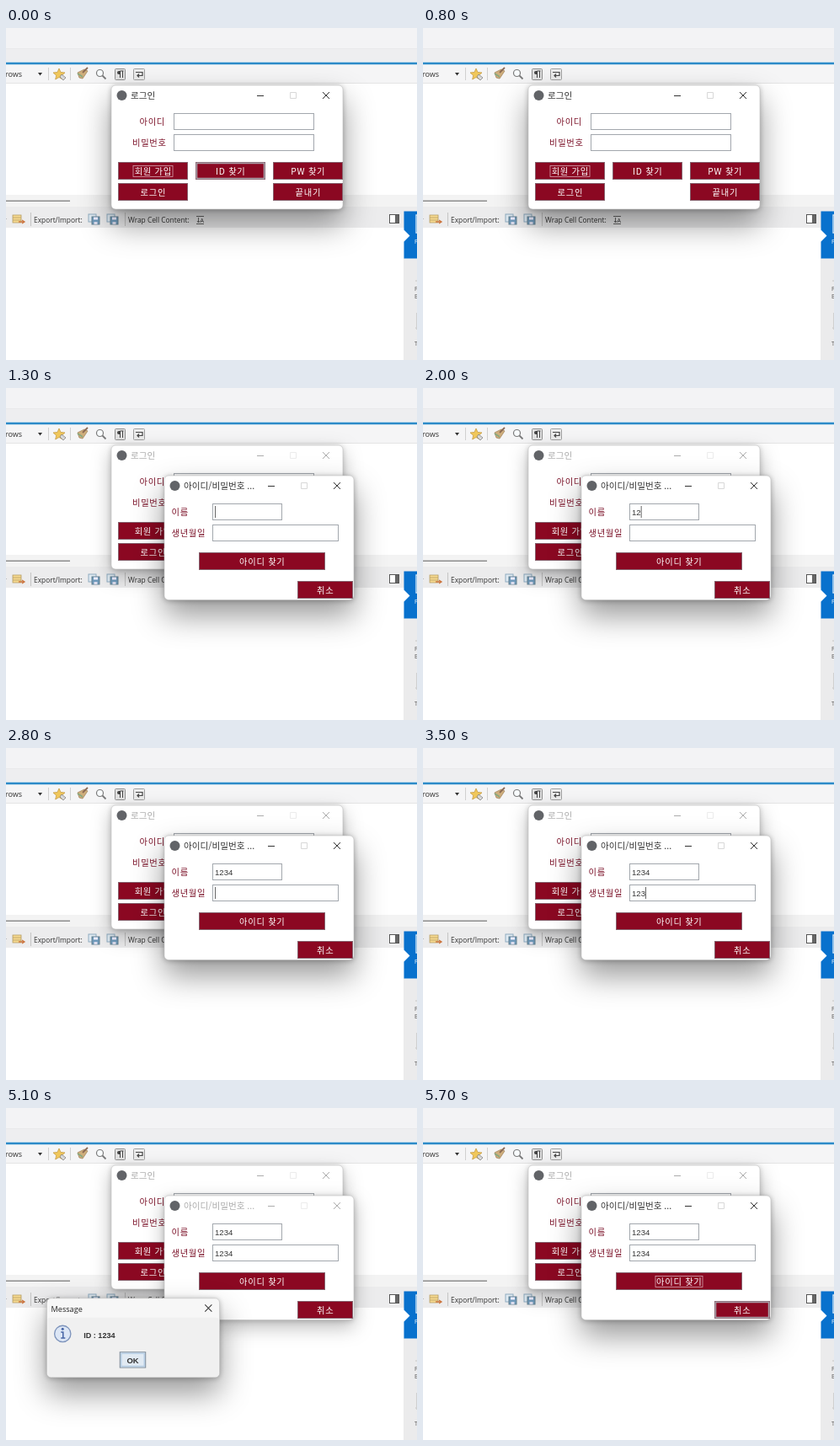
Recreate the animation shown at these times as an HTML page. Size 488 by 394 pixels, loop 5800 ms.

```html
<!DOCTYPE html>
<html lang="ko">
<head>
<meta charset="utf-8">
<style>
  html, body { margin: 0; width: 100%; height: 100%; overflow: hidden; background: #fff; }
  svg { display: block; }
  text { font-family: "Noto Sans CJK KR", "Noto Sans CJK", "Noto Sans CJK JP", sans-serif; white-space: pre; }
  .ui { font-family: "Open Sans", sans-serif; }
  .field { font-family: "Liberation Sans", Arial, sans-serif; }
  .label { font-weight: 500; letter-spacing: .7px; }
  .active { filter: drop-shadow(0 1px 3px #0004) drop-shadow(0 18px 18px #0006); }
  .idle { filter: drop-shadow(0 1px 3px #0003) drop-shadow(0 8px 11px #0004); }
</style>
</head>
<body>
<svg id="stage" width="488" height="394" viewBox="0 0 488 394"></svg>
<script>
const LOOP = 5800, STEP = 100;
const stage = document.getElementById('stage');

const rect = (x, y, w, h, fill, more = '') =>
  `<rect x="${x}" y="${y}" width="${w}" height="${h}" fill="${fill}" ${more}/>`;
const path = (d, stroke, width = 1, fill = 'none') =>
  `<path d="${d}" stroke="${stroke}" stroke-width="${width}" fill="${fill}"/>`;
const text = (x, y, s, size, fill, more = '') =>
  `<text x="${x}" y="${y}" font-size="${size}" fill="${fill}" ${more}>${s}</text>`;
const label = (x, y, s) => text(x + .5, y, s, 10.3, '#7b1027', 'class="label"');

function cross(x, y, color) {
  return path(`M${x - 4} ${y - 4}l8 8m0-8l-8 8`, color);
}

function frame(x, y, w, h, title, active) {
  const ink = active ? '#333' : '#acacac', r = x + w, cy = y + 12;
  return rect(x, y, w, h, '#fff', `rx="5" stroke="#c0c0c0" stroke-width=".6" class="${active ? 'active' : 'idle'}"`) +
    `<circle cx="${x + 12.5}" cy="${cy}" r="6" fill="#626468"/>` +
    text(x + 23, y + 16, title, 10.6, ink) +
    path(`M${r - 102} ${cy + .5}h8`, ink) +
    path(`M${r - 62.5} ${cy - 3.5}h7v7h-7z`, active ? '#d8d8d8' : '#ececec') +
    cross(r - 20, cy, ink);
}

function button(x, y, w, s, { hover, focus, half = 0 } = {}) {
  const cx = x + w / 2;
  return rect(x + .5, y + .5, w - 1, 20, '#8b0822', 'stroke="#85606c"') +
    (hover ? rect(x + 1.5, y + 1.5, w - 3, 18, 'none', 'stroke="#a9a0a8" stroke-width="1.5"') : '') +
    (focus ? rect(cx - half, y + 4.5, half * 2, 13, 'none', 'stroke="#d8a5b0" stroke-width=".8"') : '') +
    text(cx + .3, y + 14.5, s, 10.3, '#fff', 'text-anchor="middle" class="label"');
}

function field(x, y, w, value = '', caret = false) {
  const end = x + 3.5 + value.length * 5.34;
  return rect(x + .5, y + .5, w - 1, 19, '#fff', 'stroke="#a2a7ad"') +
    text(x + 3, y + 14, value, 9.6, '#333', 'class="field"') +
    (caret ? path(`M${end} ${y + 3}v14`, '#555', .9) : '');
}

function disk(x, y) {
  return rect(x, y, 9, 9, '#dfeaf2', 'stroke="#8fabc0"') +
    rect(x + 4, y + 3, 9, 9, '#6f9abb', 'stroke="#64808f"') +
    rect(x + 6, y + 3.5, 5, 3, '#eef') + rect(x + 6.5, y + 9, 4, 3, '#dde');
}

function topBar() {
  return rect(0, 0, 488, 41, '#f3f3f5') + rect(0, 25, 488, 16, '#eeeef0') +
    rect(0, 24, 488, 1, '#e9e9eb') + rect(0, 43, 488, 22, '#f5f5f6') +
    rect(0, 40, 488, 4, '#b9d7ea') + rect(0, 41, 488, 2, '#2c8ac8') +
    rect(0, 65, 488, 1, '#e4e4e4') +
    text(-1, 58, 'rows', 9, '#333', 'class="ui"') +
    path('M38 53h5l-2.5 3.5z', 'none', 0, '#333') +
    path('M50.5 47v15M76.5 47v15', '#d0d0d0') +
    path('M63 48l2 4.5 5 .5-3.7 3.2 1 4.8-4.3-2.5-4.3 2.5 1-4.8-3.7-3.2 5-.5z', '#c79c46', .8, '#f0c75a') +
    path('M66 55l5 4-3 3-4-4z', '#777', .7, '#d8d8d8') +
    path('M85 53l8-4 4 2-6 9-4-1z', '#a5875f', .8, '#cfae7c') +
    path('M91 53l6-6', '#8a6a56', 1.8) + path('M85 54l6 4', '#86a87e', 1.6) +
    `<circle cx="111.5" cy="53.5" r="4" fill="#f8fbfd" stroke="#7a7a7a" stroke-width="1.2"/>` +
    path('M114.5 56.5l4 4', '#7a7a7a', 1.8) +
    rect(129.5, 48.5, 12, 13, '#e2e2e2', 'rx="1" stroke="#8f8f8f"') +
    path('M135.5 59V51h4m-1 0v8', '#444') + path('M136 51h-2a2 2 0 0 0 0 4h2z', 'none', 0, '#444') +
    rect(151.5, 48.5, 13, 13, '#ececec', 'rx="1" stroke="#a0a0a0"') +
    path('M154 52.5h8v4h-6m2-2l-2 2 2 2', '#444', 1.2);
}

function lowerBar() {
  return rect(0, 198, 488, 14, '#f3f3f3') + rect(0, 212, 488, 25, '#ececed') +
    rect(0, 204.5, 76, 1.5, '#8d8d8d') +
    path('M-2 224l3 3', '#bbb') +
    rect(8, 222, 10, 9, '#f6d98f', 'stroke="#b59c62" stroke-width=".8"') +
    path('M8 225h10M8 228h10', '#b59c62', .8) + path('M15 230h6m-2-2l3 2-3 2', '#cc7640', 1.3) +
    path('M29.5 219v16M141.5 219v16', '#c4c4c4') +
    text(33, 231, 'Export/Import:', 8.4, '#333', 'class="ui"') +
    disk(98, 221) + disk(120, 221) +
    text(145, 231, 'Wrap Cell Content:', 8.4, '#333', 'class="ui"') +
    path('M226 223.5h9M226 232.5h9M228.5 225v6m-1.5-2l1.5 2 1.5-2', '#666') +
    text(230.5, 231, 'A', 7, '#333', 'class="ui"') +
    rect(455.5, 221.5, 11, 10, '#fff', 'stroke="#555"') + rect(462, 222, 4, 9, '#666');
}

function sidePanel() {
  return rect(472, 273, 16, 121, '#ebebec') +
    path('M472.5 217.5H488v56h-15.5v-20l7-7-7-7z', 'none', 0, '#0871cd') +
    path('M489 222h-2v21h2', '#cfe5f6', 1.4) +
    text(485, 256, 'P', 7, '#fff', 'class="ui"') +
    path('M486 300h2M486 356h2', '#c4c4c4') +
    text(485, 312, 'F', 7, '#555', 'class="ui"') +
    text(485, 321, 'E', 7, '#555', 'class="ui"') +
    text(485, 377, 'T', 7, '#555', 'class="ui"') +
    path('M487.5 338v20', '#d0d0d0');
}

function login(active, hover) {
  return frame(125, 68, 275, 147, '로그인', active) +
    label(158, 115, '아이디') + field(199, 101, 167) +
    label(149.5, 140, '비밀번호') + field(199, 126, 167) +
    button(133, 159, 83, '회원 가입', { focus: active, half: 23.5 }) +
    button(225, 159, 83, 'ID 찾기', { hover }) +
    button(317, 159, 83, 'PW 찾기') +
    button(133, 184, 83, '로그인') + button(317, 184, 83, '끝내기');
}

function finder(t, active) {
  const name = '1234'.slice(0, typed(t, [1800, 1900, 2200, 2400]));
  const birth = '1234'.slice(0, typed(t, [3100, 3300, 3500, 3700]));
  return frame(188, 104, 225, 147.5, '아이디/비밀번호 ...', active) +
    label(196, 151, '이름') + field(245, 137, 83, name, t < 2800) +
    label(196, 176, '생년월일') + field(245, 162, 150, birth, t >= 2800 && t < 4200) +
    button(229, 195, 150, '아이디 찾기', {
      hover: t >= 4000 && t < 4800, focus: active && t >= 4200, half: 28 }) +
    button(346, 229, 66, '취소', { hover: t >= 5600 });
}

function message() {
  return rect(50, 226.5, 202, 92.5, '#f7f7f7', 'rx="5" stroke="#c0c0c0" stroke-width=".6" class="active"') +
    rect(51, 249, 200, 69, '#f0f0f0', 'rx="3"') +
    text(55, 242, 'Message', 9, '#222', 'class="ui"') + cross(239, 238, '#333') +
    `<circle cx="68.5" cy="268" r="9.5" fill="#dce6f5" stroke="#7d93bb" stroke-width="1.3"/>` +
    `<circle cx="68.5" cy="262.5" r="1.5" fill="#4765a5"/>` +
    path('M66.5 266h2.5v7m-2.5 0h5', '#4765a5', 1.5) +
    text(93, 273, 'ID : 1234', 9, '#333', 'class="field" font-weight="700"') +
    rect(135.5, 289.5, 30, 18, '#e1eaf3', 'stroke="#7a8a99"') +
    rect(137, 291, 27, 15, 'none', 'stroke="#b8cfe5" stroke-width="1.5"') +
    text(150.5, 302.5, 'OK', 9.3, '#333', 'class="field" font-weight="700" text-anchor="middle"');
}

const typed = (t, keys) => keys.filter(k => t >= k).length;
const clamp = v => Math.max(0, Math.min(1, v));
const layer = (opacity, scale, cx, cy, body) => opacity <= 0 ? '' :
  `<g opacity="${opacity}" transform="translate(${cx} ${cy}) scale(${scale}) translate(${-cx} ${-cy})">${body}</g>`;

const backdrop = rect(0, 0, 488, 394, '#fff') + topBar() + lowerBar() + sidePanel();

function draw(t) {
  const popup = clamp((t - 1100) / 200);
  const opening = clamp((t - 4260) / 200), closing = clamp((t - 5200) / 200);
  const alert = opening * (1 - closing);
  stage.innerHTML = backdrop + login(!popup, t < 500) +
    layer(popup, .95 + .05 * popup, 300, 178, finder(t, alert < .5)) +
    layer(alert, .965 + .05 * opening - .04 * closing, 151, 273, message());
}

let last = -1;
function tick(now) {
  const t = Math.floor(now % LOOP / STEP) * STEP;
  if (t !== last) draw(last = t);
  requestAnimationFrame(tick);
}
tick(performance.now());
</script>
</body>
</html>
```
